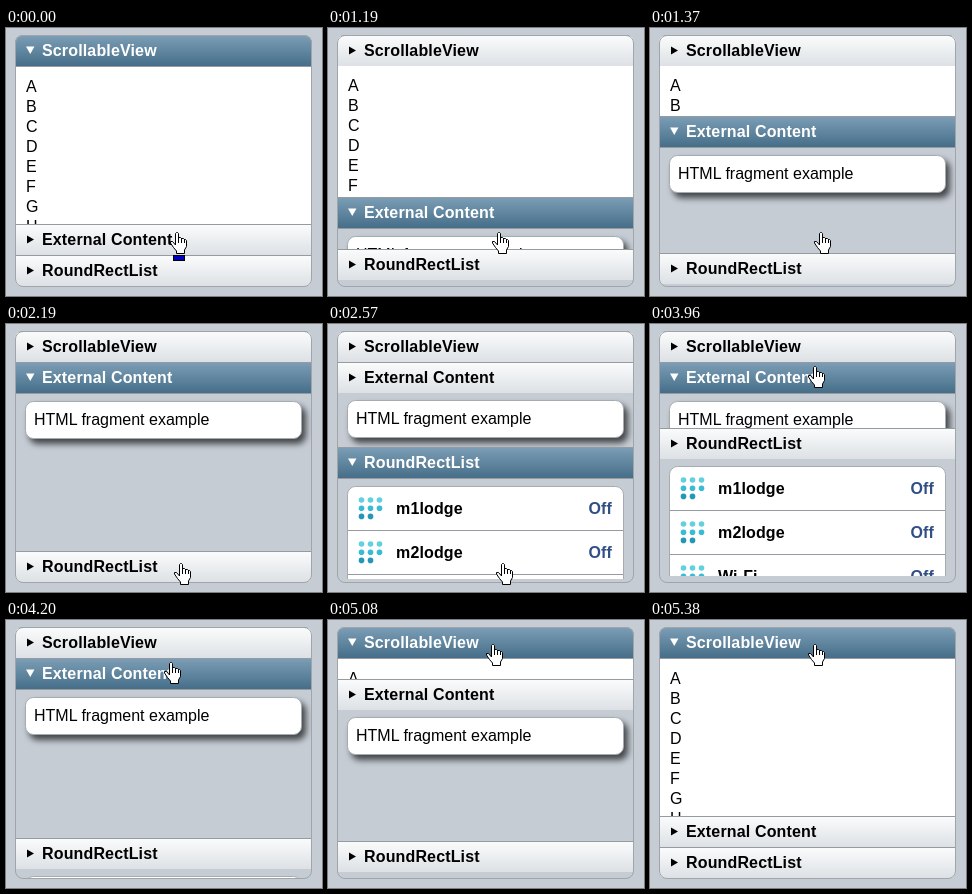
Recreate the animation shown at these times as an HTML page. Size 316 by 268 pixels, loop 6.78 s.

```html
<!DOCTYPE html>
<html lang="en">
<head>
<meta charset="utf-8">
<title>Accordion</title>
<style>
  html, body { margin: 0; width: 100%; height: 100%; overflow: hidden; background: #c5ccd4; }
  svg { display: block; width: 316px; height: 268px; }
  text { font: 16px "Liberation Sans", Arial, sans-serif; fill: #000; }
  .bold { font-weight: bold; letter-spacing: .15px; }
  .card { fill: #fff; stroke: #a6abb1; }
  .raised { filter: drop-shadow(4px 5px 3px rgba(0, 0, 0, .66)); }
  .line { fill: #969ba1; }
  .off { fill: #324f85; text-anchor: end; }
  .bar { fill: url(#plain); }
  .open .bar { fill: url(#active); }
  .open .label { fill: #fff; }
  .content { transform: translateY(-1px); }
  .open .content { transform: none; }
  .when-open, .open .right { display: none; }
  .open .when-open { display: inline; }
</style>
</head>
<body>
<svg viewBox="0 0 316 268">
  <defs>
    <linearGradient id="plain" x2="0" y2="1">
      <stop stop-color="#fafbfb"/><stop offset="1" stop-color="#dde1e5"/>
    </linearGradient>
    <linearGradient id="active" x2="0" y2="1">
      <stop stop-color="#7b9db5"/><stop offset="1" stop-color="#466e89"/>
    </linearGradient>
    <clipPath id="frame"><rect x="9" y="7" width="297" height="252" rx="8"/></clipPath>
  </defs>
  <rect width="316" height="268" fill="#c5ccd4"/>
  <g id="panels" clip-path="url(#frame)"></g>
  <rect x="9.5" y="7.5" width="296" height="251" rx="7.5" fill="none" stroke="#9fa5ab"/>
  <g id="hand">
    <rect id="press" x="3.5" y="23.5" width="11" height="5" fill="#0000c0" stroke="#000"/>
    <path fill="#fff" stroke="#000" stroke-linejoin="round" d="M5.5 13V1.5L6.5 .5H7.5L8.5 1.5V5.5H10.5L11.5 6.5H13.5L14.5 7.5H15.5L16.5 8.5V14.5L14.5 18V21.5H6.5V19L3.5 15.5L.5 11V9.5H2.5Z"/>
    <path fill="none" stroke="#000" d="M8.5 5V11M11.5 6V11M14.5 7V11"/>
  </g>
</svg>
<script>
const LOOP = 6780, STEP = 60, TITLE = 31, FULL = 158;
const $ = id => document.getElementById(id);

// Panel coordinates start at the line above each title bar.
const title = name => `
  <rect class="line" x="9" width="297" height="1"/>
  <rect class="bar" x="9" y="1" width="297" height="30"/>
  <rect class="line when-open" x="9" y="31" width="297" height="1"/>
  <path class="right" d="M21 11.5L28 15.5L21 19.5Z"/>
  <path class="when-open" fill="#fff" d="M20 11.5H28.5L24.25 19Z"/>
  <text class="label bold" x="36" y="21">${name}</text>`;

const letters = `<rect x="9" y="31" width="297" height="160" fill="#fff"/>` +
  [..."ABCDEFGH"].map((c, i) => `<text x="20" y="${57 + 20 * i}">${c}</text>`).join("");

const fragment = `<rect class="card raised" x="19.5" y="39.5" width="276" height="37" rx="8"/>
  <text x="28" y="63">HTML fragment example</text>`;

// Eight dots, three to a row, darker towards the bottom.
const icon = y => Array.from({ length: 8 }, (_, i) => {
  const r = Math.floor(i / 3);
  return `<circle cx="${33.5 + 9 * (i % 3)}" cy="${y + 8.2 * r}" r="2.8"
    fill="hsl(${187 + 3 * r} 66% ${63 - 10 * r}%)"/>`;
}).join("");

const row = (name, i) => {
  const y = 44 * i;
  return (i ? `<rect class="line" x="20" y="${39 + y}" width="275" height="1"/>` : "") +
    icon(53 + y) +
    `<text class="bold" x="68" y="${67 + y}">${name}</text>
     <text class="bold off" x="284" y="${67 + y}">Off</text>`;
};

const list = `<rect class="card" x="19.5" y="39.5" width="276" height="132" rx="8"/>` +
  ["m1lodge", "m2lodge", "Wi-Fi"].map(row).join("");

const panel = ([name, content], i) => `
  <clipPath id="clip${i}"><rect x="9" width="297"/></clipPath>
  <g class="panel" clip-path="url(#clip${i})">
    <g class="content">${content}</g>${title(name)}
  </g>`;

$("panels").innerHTML = [
  ["ScrollableView", letters],
  ["External Content", fragment],
  ["RoundRectList", list]
].map(panel).join("");
const panels = [...document.querySelectorAll(".panel")];
const clips = panels.map((_, i) => $("clip" + i).firstElementChild);

// lead: how far the pane has opened in its first step.
const switches = [
  { at: 1190, from: 0, to: 1, lead: .13 },
  { at: 2450, from: 1, to: 2, lead: .28 },
  { at: 3960, from: 2, to: 1, lead: .22 },
  { at: 5080, from: 1, to: 0, lead: .13 }
];

const moves = [
  { at: 1760, end: 2190, to: [168, 239] },
  { at: 2960, end: 3440, to: [158, 42] },
  { at: 4330, end: 4750, to: [158, 24] }
];

const steps = ms => Math.floor(ms / STEP);
const ease = u => (1 - Math.cos(Math.PI * u)) / 2;

function paneState(t) {
  const heights = [FULL, 0, 0];
  let open = 0;
  for (const { at, from, to, lead } of switches) {
    if (t < at) break;
    const left = Math.max(0, 1 - lead - .18 * steps(t - at));
    heights[to] = Math.round(FULL * (1 - left));
    heights[from] = Math.round(FULL * left * .95);
    open = to;
  }
  return { heights, open };
}

function handPlace(t) {
  let place = [164, 204];
  for (const { at, end, to } of moves) {
    if (t < at) break;
    const u = Math.min(1, steps(t - at) * STEP / (end - at));
    const k = t >= end ? 1 : ease(u);
    place = place.map((v, i) => Math.round(v + (to[i] - v) * k));
  }
  return place;
}

function draw(t) {
  const { heights, open } = paneState(t);
  let y = 7;
  panels.forEach((p, i) => {
    p.setAttribute("transform", `translate(0 ${y})`);
    p.classList.toggle("open", i === open);
    clips[i].setAttribute("height", TITLE + heights[i]);
    y += TITLE + heights[i];
  });
  $("hand").setAttribute("transform", `translate(${handPlace(t).join(" ")})`);
  const pressed = t < 60 || (t >= 3020 && t < 3260);
  $("press").setAttribute("visibility", pressed ? "visible" : "hidden");
}

const start = performance.now();
function tick() {
  draw((performance.now() - start) % LOOP);
  requestAnimationFrame(tick);
}
tick();
</script>
</body>
</html>
```
